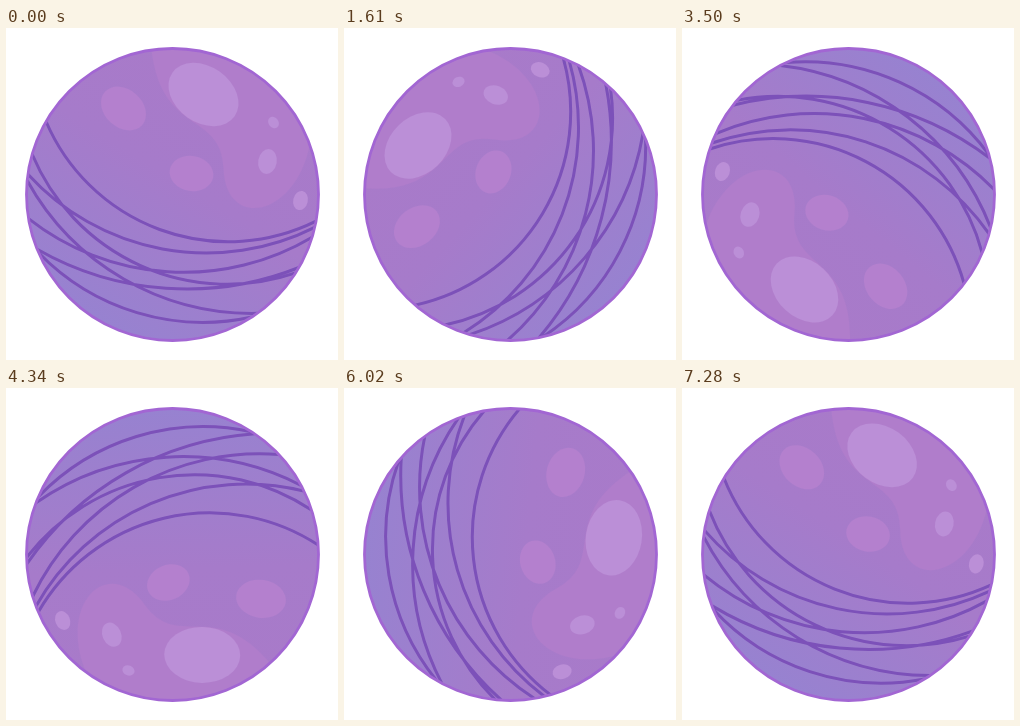
Animation, 332 px wide and 332 px high, one loop 7350 ms. Source, as an HTML page:

```html
<!DOCTYPE html>
<html lang="en">
<head>
<meta charset="utf-8">
<title>Rolling yarn ball</title>
<style>
html, body { margin: 0; width: 100%; height: 100%; overflow: hidden; background: #fff; }
svg { display: block; width: 100vw; height: 100vh; }
</style>
</head>
<body>
<svg viewBox="-166.5 -166.5 332 332">
  <defs>
    <linearGradient id="shade" gradientUnits="userSpaceOnUse" x1="77" y1="-124" x2="-77" y2="124">
      <stop offset="0" stop-color="#a97ac9"/>
      <stop offset=".45" stop-color="#a67bca"/>
      <stop offset="1" stop-color="#9782d0"/>
    </linearGradient>
    <clipPath id="ball"><circle r="146"/></clipPath>
  </defs>
  <g id="spin" clip-path="url(#ball)">
    <circle r="146" fill="url(#shade)"/>
    <path fill="#b07dcb" d="M-22 -156C-16 -56 49 -86 51 -26S119 24 136 -44L160 -160Z"/>
    <g fill="#b480ce">
      <ellipse rx="25" ry="19" transform="translate(-49 -86) rotate(42)"/>
      <ellipse rx="22" ry="17.5" transform="translate(19 -21) rotate(10)"/>
    </g>
    <g fill="#bb8fd7">
      <ellipse rx="38" ry="28" transform="translate(31 -100) rotate(35)"/>
      <ellipse rx="9.3" ry="12.5" transform="translate(95 -33) rotate(10)"/>
      <ellipse rx="5" ry="6.2" transform="translate(101 -72) rotate(-35)"/>
      <ellipse rx="7.3" ry="9.7" transform="translate(128 6) rotate(12)"/>
    </g>
    <path id="threads" fill="none" stroke="#7c51b9" stroke-width="3"/>
  </g>
  <circle r="146" fill="none" stroke="#a266d3" stroke-width="2.8"/>
</svg>
<script>
const RADIUS = 146, STEP = 70, STEPS = 105, TURN = 3.447;
const threads = document.getElementById('threads');
const spin = document.getElementById('spin');

function rim(degrees) {
  const a = degrees * Math.PI / 180;
  return [RADIUS * Math.cos(a), RADIUS * Math.sin(a)];
}

// Circular arc between two rim angles, sagging by the given depth below its chord.
function thread(from, to, sag) {
  const [x0, y0] = rim(from), [x1, y1] = rim(to);
  const half = Math.hypot(x1 - x0, y1 - y0) / 2;
  const r = (half * half + sag * sag) / (2 * sag);
  return `M${x0} ${y0}A${r} ${r} 0 0 0 ${x1} ${y1}`;
}

threads.setAttribute('d', [
  thread(210, 10.5, 62),
  thread(196, 32.5, 57),
  thread(188, 13, 49),
  thread(185.5, 54.5, 37),
  thread(170.5, 17, 44),
  thread(158, 30, 30),
  thread(156.5, 57, 29)
].join(''));

function draw() {
  const step = Math.floor(performance.now() / STEP) % STEPS;
  spin.setAttribute('transform', `rotate(${-TURN * step})`);
  requestAnimationFrame(draw);
}
draw();
</script>
</body>
</html>
```
